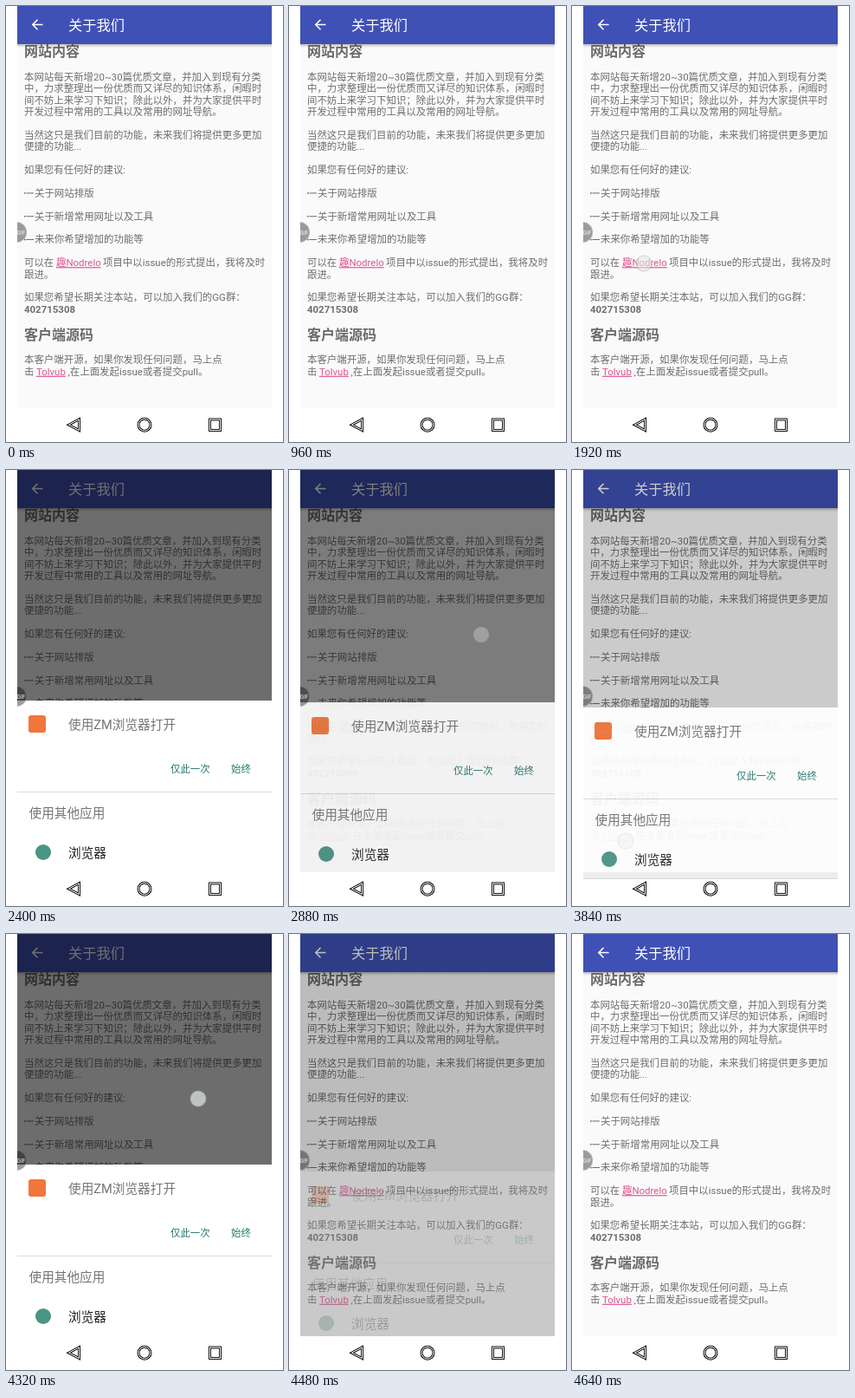
Write an HTML page that moves like this. It is 320 by 503 pixels and loops after 4800 ms.

```html
<!DOCTYPE html>
<html lang="zh-CN">
<head>
<meta charset="utf-8">
<title>关于我们</title>
<style>
html, body { margin: 0; width: 100%; height: 100%; overflow: hidden; background: #fff; }
svg { display: block; width: 100vw; height: 100vh; }
text { font-family: Roboto, "Noto Sans CJK SC", "Noto Sans CJK", "Noto Sans CJK JP", sans-serif; white-space: pre; }
.body { font-size: 11.45px; fill: #6e6e6e; }
.bold { font-weight: 700; }
.head { font-size: 16px; font-weight: 700; fill: #6a6a6a; }
.link { fill: #dc5590; text-decoration: underline; }
.large { font-size: 14.65px; fill: #757575; }
.action { font-size: 11.4px; fill: #20796c; }
.nav .edge { fill: none; stroke: #111; stroke-width: 3; }
.nav .core { fill: none; stroke: #fff; stroke-width: 1; }

#dim, #sheet, #seam, #touch { opacity: 0; animation: 4.8s step-end infinite; }
#dim { animation-name: dim; }
#sheet { animation-name: sheet; }
#seam { animation-name: seam; }
#touch { animation-name: touch; }

@keyframes dim {
  0% { opacity: 0; }
  46.6667% { opacity: .19; }
  50% { opacity: .56; }
  60% { opacity: .5; }
  63.3333% { opacity: .07; }
  66.6667% { opacity: 0; }
  80% { opacity: .19; }
  83.3333% { opacity: .56; }
  93.3333% { opacity: .25; }
  96.6667%, 100% { opacity: 0; }
}
@keyframes sheet {
  0% { opacity: 0; transform: none; }
  46.6667% { opacity: .94; transform: translateY(8px); }
  50% { opacity: 1; transform: none; }
  60% { opacity: .9; transform: translateY(2px); }
  63.3333% { opacity: 0; transform: none; }
  80% { opacity: .94; transform: translateY(8px); }
  83.3333% { opacity: 1; transform: none; }
  93.3333% { opacity: .2; transform: translateY(8px); }
  96.6667%, 100% { opacity: 0; transform: none; }
}
@keyframes seam {
  0%, 50%, 83.3333%, 100% { opacity: 0; }
  46.6667%, 80% { opacity: 1; }
}
@keyframes touch {
  0% { opacity: 0; transform: translate(83px, 297px); }
  40% { opacity: .8; transform: translate(83px, 297px); }
  43.3333% { opacity: 1; transform: translate(83px, 297px); }
  46.6667% { opacity: .35; transform: translate(83px, 297px); }
  50% { opacity: 0; transform: translate(222px, 190px); }
  56.6667% { opacity: 1; transform: translate(222px, 190px); }
  60% { opacity: .5; transform: translate(222px, 190px); }
  63.3333% { opacity: 0; transform: translate(62px, 428px); }
  73.3333% { opacity: .8; transform: translate(62px, 428px); }
  76.6667% { opacity: 1; transform: translate(62px, 428px); }
  80% { opacity: .35; transform: translate(62px, 428px); }
  83.3333% { opacity: 0; transform: translate(222px, 190px); }
  90% { opacity: 1; transform: translate(222px, 190px); }
  93.3333%, 100% { opacity: 0; transform: translate(222px, 190px); }
}
</style>
</head>
<body>
<svg viewBox="0 0 320 503" preserveAspectRatio="none">
  <defs>
    <clipPath id="screen"><rect x="13" width="294" height="464"/></clipPath>
    <linearGradient id="shade" x2="0" y2="1">
      <stop stop-color="#000" stop-opacity=".25"/>
      <stop offset="1" stop-color="#000" stop-opacity="0"/>
    </linearGradient>
  </defs>

  <g clip-path="url(#screen)">
    <rect x="13" width="294" height="464" fill="#fafafa"/>
    <g id="page">
      <text class="head" x="21" y="58">网站内容</text>
      <text class="head" x="21" y="384.5">客户端源码</text>
    </g>
    <rect x="13" width="294" height="44" fill="#3f51b5"/>
    <rect x="13" y="44" width="294" height="4" fill="url(#shade)"/>
    <path d="M42.5 21.5H31M36.5 15.8L30.8 21.5L36.5 27.2" fill="none" stroke="#fff" stroke-width="1.6"/>
    <text x="72" y="28" font-size="16.25" font-weight="500" fill="#fff">关于我们</text>

    <rect id="dim" x="13" width="294" height="464"/>

    <g id="sheet">
      <rect x="13" y="266" width="294" height="198" fill="#fff"/>
      <rect x="26" y="283" width="20" height="20" rx="3" fill="#f0763a"/>
      <text class="large" x="72" y="298.5">使用ZM浏览器打开</text>
      <text class="action" x="190" y="349.4">仅此一次</text>
      <text class="action" x="260" y="349.4">始终</text>
      <rect x="13" y="371" width="294" height="1" fill="#dcdcdc"/>
      <text class="large" x="26.5" y="400.7">使用其他应用</text>
      <circle cx="43" cy="441" r="9" fill="#4a9485"/>
      <text class="large" x="72" y="446.5" style="fill:#212121">浏览器</text>
    </g>

    <g id="badge">
      <circle cx="12" cy="261" r="12" fill="#000" fill-opacity=".38"/>
      <circle cx="12" cy="261" r="11.7" fill="none" stroke="#fff" stroke-opacity=".35" stroke-width=".7"/>
      <text x="17.5" y="263.5" text-anchor="middle" font-size="6.5" fill="#fff" fill-opacity=".9">GIF</text>
    </g>
  </g>

  <g id="seam">
    <rect x="13" y="464" width="294" height="7" fill="#ededed"/>
    <rect x="13" y="471" width="294" height="1" fill="#d8d8d8"/>
  </g>

  <g class="nav">
    <g id="keys">
      <path d="M72.5 483.2L84.5 476.8V489.6Z"/>
      <circle cx="160" cy="483.2" r="7"/>
      <rect x="235.5" y="477" width="12" height="12.5"/>
    </g>
  </g>

  <g id="touch">
    <circle r="9" fill="#e2e8e6" fill-opacity=".7" stroke="#a4a8a8" stroke-opacity=".55" stroke-width="1.2"/>
  </g>
</svg>
<script>
const NS = "http://www.w3.org/2000/svg";
const page = document.getElementById("page");

function add(tag, attrs, content = "") {
  const node = document.createElementNS(NS, tag);
  for (const key in attrs) node.setAttribute(key, attrs[key]);
  node.textContent = content;
  page.append(node);
}

// Rows sit on a 13.4px line grid.
const rowY = row => 85.8 + row * 13.4;
const write = (row, content, x = 21, kind = "") =>
  add("text", { class: "body " + kind, x, y: rowY(row) }, content);

write(0, "本网站每天新增20~30篇优质文章，并加入到现有分类");
write(1, "中，力求整理出一份优质而又详尽的知识体系，闲暇时");
write(2, "间不妨上来学习下知识；除此以外，并为大家提供平时");
write(3, "开发过程中常用的工具以及常用的网址导航。");
write(5, "当然这只是我们目前的功能，未来我们将提供更多更加");
write(6, "便捷的功能...");
write(8, "如果您有任何好的建议:");

["关于网站排版", "关于新增常用网址以及工具", "未来你希望增加的功能等"].forEach((item, i) => {
  const row = 10 + i * 2;
  const y = rowY(row) - 4.4;
  add("rect", { x: 21, y: y - .3, width: 1.6, height: 1.6, fill: "#6e6e6e" });
  add("rect", { x: 23.5, y, width: 8.5, height: 1, fill: "#6e6e6e" });
  write(row, item, 33);
});

write(16, "可以在");
write(16, "趣Nodrelo", 58, "link");
write(16, "项目中以issue的形式提出，我将及时", 112);
write(17, "跟进。");
write(19, "如果您希望长期关注本站，可以加入我们的GG群：");
write(20, "402715308", 21, "bold");
write(24.37, "本客户端开源，如果你发现任何问题，马上点");
write(25.37, "击");
write(25.37, "Tolvub", 35, "link");
write(25.37, ",在上面发起issue或者提交pull。", 71.5);

// Each navigation key is a dark outline split by a white one.
const keys = document.getElementById("keys");
const core = keys.cloneNode(true);
core.removeAttribute("id");
keys.setAttribute("class", "edge");
core.setAttribute("class", "core");
keys.after(core);
</script>
</body>
</html>
```
